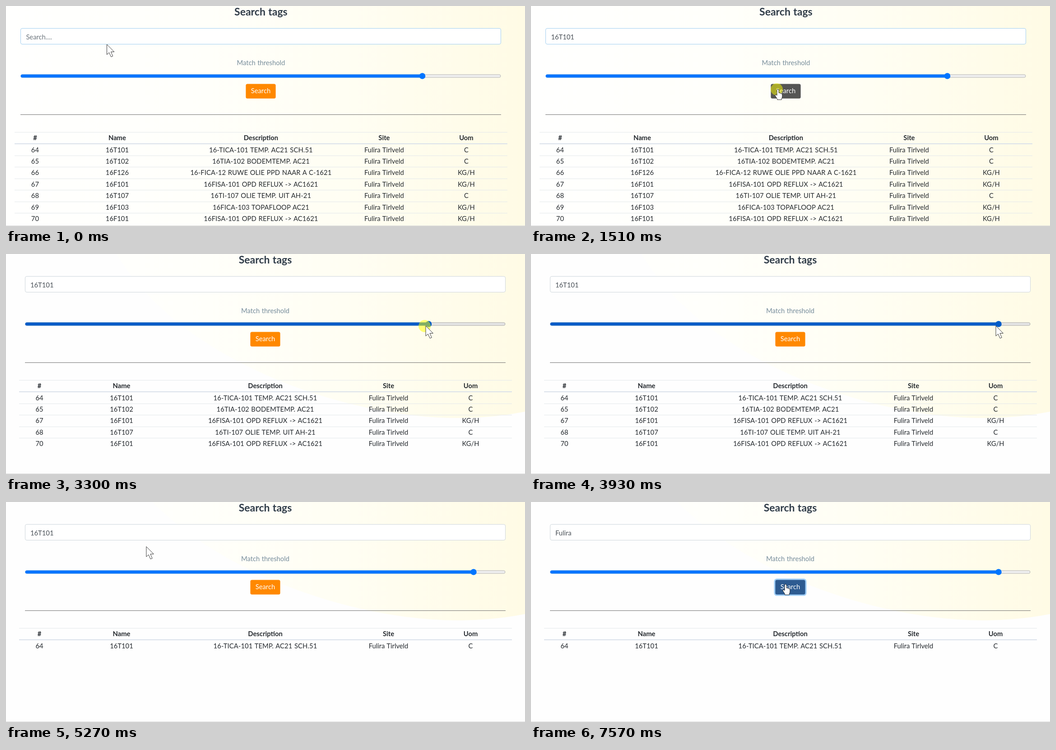
An HTML page for the animation above (7.99 s loop, 1150 by 487 pixels).

```html
<!DOCTYPE html>
<html lang="en">
<head>
<meta charset="utf-8">
<title>Search tags</title>
<style>
  html, body { margin: 0; width: 100%; height: 100%; overflow: hidden; background: #fefefe; }
  body { position: relative; font: 14.75px/24px Lato, "Open Sans", sans-serif; color: #24292e; word-spacing: .05em; }
  svg { position: absolute; left: 0; top: 0; width: 1150px; height: 487px; }
  #page, #page > div { position: absolute; box-sizing: border-box; }
  #page { left: 0; top: 0; width: 1149px; height: 487px; }
  .mid { left: 0; width: 100%; text-align: center; white-space: nowrap; }
  #title { top: 0; font-weight: 700; font-size: 23px; color: #2f3b48; }
  #label { top: 113px; color: #768c9b; }
  #field { left: 42px; top: 49px; width: 1065px; height: 36px; padding-left: 11px; line-height: 32px;
    border: 1px solid #ced6dc; border-radius: 4px; background: #fff; color: #495057; white-space: pre; }
  #field.focus { border-color: #a1cff0; }
  #field.empty { color: #6c757d; }
  #text { display: inline-block; height: 20px; line-height: 20px; vertical-align: middle; }
  .picked #text { background: #0078d7; color: #fff; }
  #caret { display: inline-block; width: 1px; height: 20px; vertical-align: middle; background: #333; }
  #track { fill: #efefef; stroke: #b2b2b2; }
  #fill, #thumb { fill: #0075ff; }
  .hot #fill, .hot #thumb { fill: #005cc8; }
  .hot #track { fill: #e5e5e5; stroke: #a6a6a6; }
  #button { fill: #f80; }
  #button.hover { fill: #555; }
  #button.ring { fill: #2d5b91; }
  #halo { fill: #a1cff8; display: none; }
  .ring #halo { display: inline; }
  #button text { fill: #fff; text-anchor: middle; }
  #rule { left: 42px; top: 240px; width: 1065px; height: 1px; background: #707070; }
  .row { left: 28.5px; width: 1092px; height: 25.4px; line-height: 23px; display: grid;
    grid-template-columns: 1fr 3fr 4fr 2fr 2fr; text-align: center; white-space: nowrap; border-top: 1px solid #e3e8eb; }
  .row.first { border-color: transparent; }
  .row span:nth-child(3) { letter-spacing: .12px; }
  .row.head { top: 279px; height: 27px; border-bottom: 2px solid #dae1ea; font-weight: 700; }
  .row.head span { letter-spacing: 0; }
  #edge { position: absolute; left: 0; top: 486px; width: 1150px; height: 1px; background: #d9d9d9; }
</style>
</head>
<body>
<svg viewBox="0 0 1150 487">
  <linearGradient id="glow" gradientUnits="userSpaceOnUse" x1="0" y1="0" x2="1150" y2="0">
    <stop offset="0" stop-color="#fffffe"/>
    <stop offset=".35" stop-color="#fffffb"/>
    <stop offset=".65" stop-color="#fffef3"/>
    <stop offset="1" stop-color="#fffbe5"/>
  </linearGradient>
  <path id="wave" fill="url(#glow)"
    d="M0-1300V-600Q150-250 245-101C385 135 750 262 1000 262Q1080 262 1150 248V-1300Z"/>
</svg>

<div id="page">
  <svg viewBox="0 0 1150 487">
    <g id="slider">
      <rect id="track" x="43" y="151.9" width="1063" height="6.2" rx="3.1"/>
      <rect id="fill" x="42.5" y="151.4" height="7.2" rx="3.6"/>
      <circle id="thumb" cy="155" r="6.8"/>
    </g>
    <g id="button">
      <rect id="halo" x="538.4" y="169.4" width="72.2" height="38.4" rx="6.5"/>
      <rect x="541.4" y="172.4" width="66.2" height="32.4" rx="3.6"/>
      <text x="574.5" y="193">Search</text>
    </g>
  </svg>
  <div id="title" class="mid">Search tags</div>
  <div id="field"><span id="text"></span><span id="caret"></span></div>
  <div id="label" class="mid">Match threshold</div>
  <div id="rule"></div>
  <div class="row head"><span>#</span><span>Name</span><span>Description</span><span>Site</span><span>Uom</span></div>
  <div id="rows"></div>
</div>
<div id="edge"></div>

<svg viewBox="0 0 1150 487">
  <g id="pointer" fill="#fff" stroke="#222" stroke-width=".9" stroke-linejoin="round">
    <circle id="press" cx="-2.5" cy=".5" r="13.5" fill="#ff0" fill-opacity=".5" stroke="none"/>
    <path id="arrow" d="M0 0V22.5L5 18L9.3 27.5L13.2 26L9 16.5H16.3Z"/>
    <path id="hand" d="M-2 14V2a2 2 0 0 1 4 0V8.3q2.2-.9 3 .9q2-.5 2.6 1q2.2-.2 2.2 2V17q0 2-1.5 3.5V23.5H-1.5V21.5L-6 14.5q-.3-2.6 2-2.2z"/>
    <path id="beam" fill="none" d="M-3.5-9Q0-9 0-7Q0-9 3.5-9M0-7V7M-3.5 9Q0 9 0 7Q0 9 3.5 9"/>
  </g>
</svg>

<script>
const LOOP = 7990;
const $ = id => document.getElementById(id);

const SITE = "Fulira Tirlveld";
const TAGS = [
  [64, "16T101", "16-TICA-101 TEMP. AC21 SCH.51", "C"],
  [65, "16T102", "16TIA-102 BODEMTEMP. AC21", "C"],
  [66, "16F126", "16-FICA-12 RUWE OLIE PPD NAAR A C-1621", "KG/H"],
  [67, "16F101", "16FISA-101 OPD REFLUX -> AC1621", "KG/H"],
  [68, "16T107", "16TI-107 OLIE TEMP. UIT AH-21", "C"],
  [69, "16F103", "16FICA-103 TOPAFLOOP AC21", "KG/H"],
  [70, "16F101", "16FISA-101 OPD REFLUX -> AC1621", "KG/H"]
];

// Each result list: start time, page shift, wave offset, row filter
const VIEWS = [
  { from: 0, shift: -9.6, wave: 1200, keep: () => true },
  { from: 1750, shift: 0, wave: 101, keep: id => id !== 66 && id !== 69 },
  { from: 4950, shift: 0, wave: 0, keep: id => id === 64 }
];

// Time, x, y
const PATH = [
  [0, 223.5, 85], [320, 223.5, 85], [500, 238, 85],
  [1150, 238, 85], [1420, 547, 184],
  [2240, 547, 184], [2300, 509, 176],
  [2440, 509, 176], [2570, 680, 225], [2700, 837, 216], [3000, 926, 159],
  [3280, 926, 159], [3820, 1030, 159],
  [3970, 1030, 159], [4090, 650, 178], [4350, 575, 187],
  [5180, 575, 187], [5270, 311, 99], [5400, 300, 62],
  [6900, 300, 62], [7040, 317, 132], [7300, 564, 182]
];
const THUMB = [[3280, 932.5], [3820, 1036]];

const HOVER = [[1400, 1600], [4250, 4650], [7270, 7480]];
const RING = [[1600, 1750], [4650, 4950], [7480, LOOP]];
const PRESS = [[1490, 1590], [3240, 3870], [4560, 4640], [5420, 5500], [7390, 7470]];
const FOCUS = [[0, 1560], [5420, 7450]];
const CARET = [[170, 1190], [5900, 6940]];
const PICKED = [[5540, 5900]];
const HOT = [[2980, 4030]];

const TYPING = [
  { word: "16T101", keys: [170, 320, 500, 720, 870, 1020] },
  { word: "Fulira", keys: [5900, 6050, 6200, 6370, 6540, 6710] }
];

const within = (t, spans) => spans.some(([a, b]) => t >= a && t < b);

function sample(keys, t) {
  const n = keys.findIndex(k => k[0] > t);
  if (n < 0) return keys[keys.length - 1].slice(1);
  if (n === 0) return keys[0].slice(1);
  const a = keys[n - 1], b = keys[n], f = (t - a[0]) / (b[0] - a[0]);
  return a.slice(1).map((v, i) => v + (b[i + 1] - v) * f);
}

function typed(t) {
  const { word, keys } = TYPING[t < TYPING[1].keys[0] ? 0 : 1];
  return word.slice(0, keys.filter(k => k <= t).length);
}

let shown;
function showView(view) {
  if (view === shown) return;
  shown = view;
  $("page").style.left = view.shift + "px";
  $("wave").setAttribute("transform", `translate(0 ${view.wave})`);
  $("rows").replaceChildren(...TAGS.filter(tag => view.keep(tag[0])).map(([id, name, text, unit], i) => {
    const row = document.createElement("div");
    row.className = i ? "row" : "row first";
    row.style.position = "absolute";
    row.style.top = 305.5 + 25.4 * i + "px";
    for (const cell of [id, name, text, SITE, unit]) {
      const span = document.createElement("span");
      span.textContent = cell;
      row.append(span);
    }
    return row;
  }));
}

function pointerKind(x, y, shift) {
  if (y > 50 && y < 84 && x > 42 + shift && x < 1107 + shift) return "beam";
  if (y > 172 && y < 205 && x > 541 + shift && x < 608 + shift) return "hand";
  return "arrow";
}

function draw(t) {
  const view = VIEWS.filter(v => v.from <= t).pop();
  showView(view);

  const text = typed(t), field = $("field").classList;
  $("text").textContent = text || "Search....";
  $("caret").style.visibility = within(t, CARET) ? "visible" : "hidden";
  field.toggle("empty", !text);
  field.toggle("focus", within(t, FOCUS));
  field.toggle("picked", within(t, PICKED));

  const [thumb] = sample(THUMB, t);
  $("fill").setAttribute("width", thumb - 42.5);
  $("thumb").setAttribute("cx", thumb);
  $("slider").classList.toggle("hot", within(t, HOT));

  $("button").classList.toggle("hover", within(t, HOVER));
  $("button").classList.toggle("ring", within(t, RING));

  const [x, y] = sample(PATH, t), kind = pointerKind(x, y, view.shift);
  $("pointer").setAttribute("transform", `translate(${x} ${y})`);
  for (const id of ["arrow", "hand", "beam"]) $(id).style.display = id === kind ? "" : "none";
  $("press").style.display = within(t, PRESS) ? "" : "none";
}

const start = performance.now();
function tick() {
  draw((performance.now() - start) % LOOP);
  requestAnimationFrame(tick);
}
tick();
</script>
</body>
</html>
```
